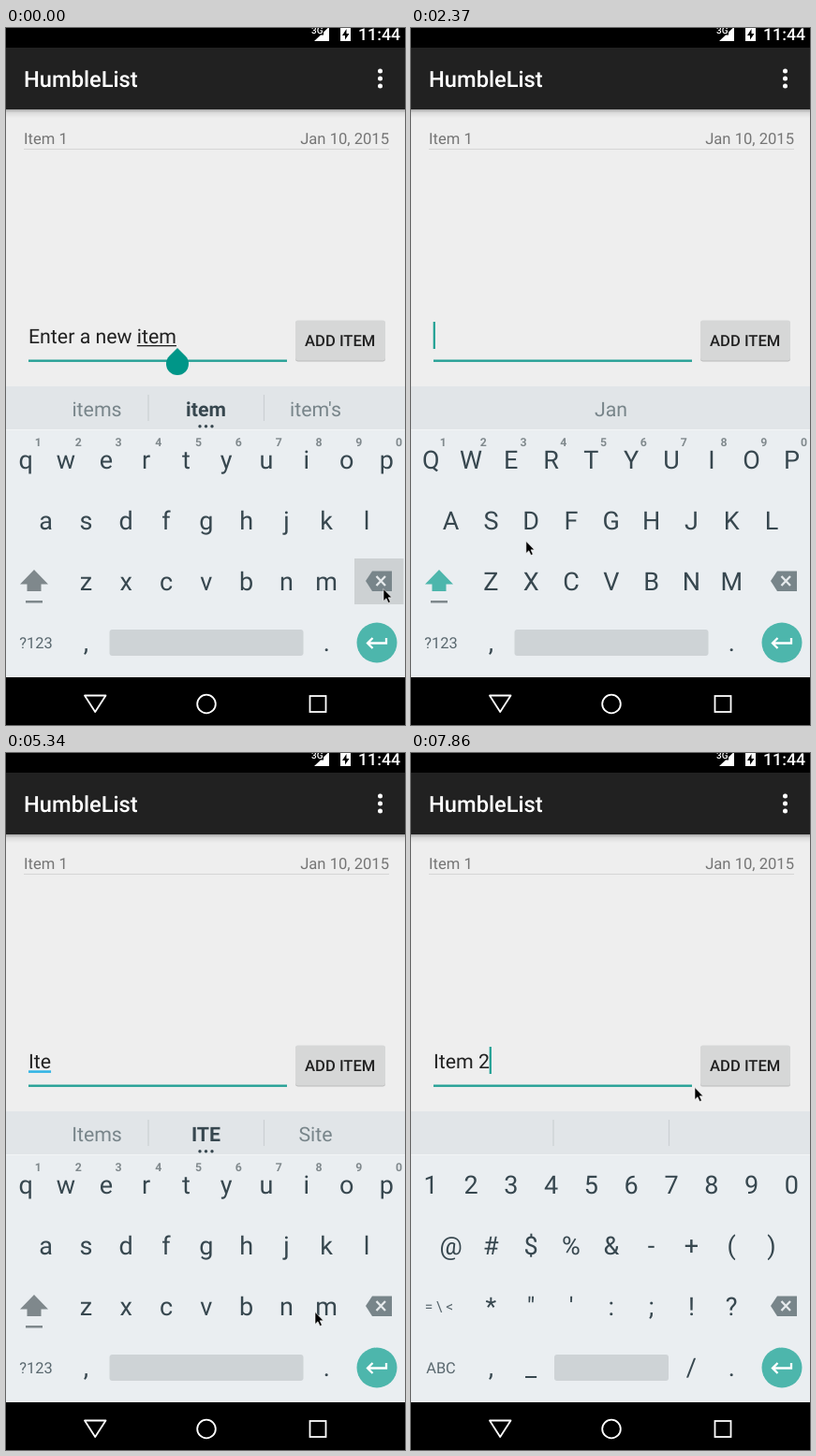
These frames come from a looping animation (426 by 745 pixels, 8000 ms). An HTML page:

```html
<!DOCTYPE html>
<html lang="en">
<head>
<meta charset="utf-8">
<title>Todo entry</title>
<style>
  html, body { margin: 0; width: 100%; height: 100%; overflow: hidden; background: #000; }
  svg { display: block; width: 426px; height: 745px; font-family: Roboto, Arial, sans-serif; }
  text { white-space: pre; text-rendering: geometricPrecision; }
  .mid { text-anchor: middle; }
  .medium { font-weight: 500; }
  .key { font-size: 27px; fill: #37474f; text-anchor: middle; }
  .small { font-size: 16.4px; fill: #5a686f; text-anchor: middle; }
  .hint { font-size: 12.3px; font-weight: 700; fill: #80898d; text-anchor: middle; }
  .word { font-size: 21.3px; fill: #78858a; text-anchor: middle; }
  .word.bold { font-weight: 700; fill: #37474f; }
  .row { font-size: 16.6px; fill: #757575; }
</style>
</head>
<body>
<svg viewBox="0 0 426 745">
  <defs>
    <linearGradient id="shade" x2="0" y2="1">
      <stop stop-color="#000" stop-opacity=".3"/>
      <stop offset=".4" stop-color="#000" stop-opacity=".08"/>
      <stop offset="1" stop-color="#000" stop-opacity="0"/>
    </linearGradient>
  </defs>
  <rect width="426" height="745"/>

  <!-- status bar -->
  <g fill="#fff">
    <text x="326" y="6" font-size="10" class="medium">3G</text>
    <path d="M345 0V14H329L336 7.5H339V4.500L343.500 0Z"/>
    <path d="M357 0H368V14H357Z"/>
    <path d="M363.500 1L359 8H362V12.500L366.500 6H363.500Z" fill="#000"/>
    <text x="376" y="12.500" font-size="17.800" class="medium">11:44</text>
  </g>

  <!-- app bar and list -->
  <rect y="87" width="426" height="296" fill="#eee"/>
  <rect y="87" width="426" height="9" fill="url(#shade)"/>
  <rect y="21" width="426" height="66" fill="#212121"/>
  <g fill="#fff">
    <text x="19" y="63" font-size="23.700" class="medium">HumbleList</text>
    <circle cx="399.500" cy="46" r="2.500"/>
    <circle cx="399.500" cy="54" r="2.500"/>
    <circle cx="399.500" cy="62" r="2.500"/>
  </g>
  <text class="row" x="19" y="124">Item 1</text>
  <text class="row" x="409" y="124" text-anchor="end">Jan 10, 2015</text>
  <rect x="19" y="129" width="390" height="1" fill="#d5d5d5"/>

  <!-- input -->
  <text id="entry" x="24" y="337" font-size="21.300" fill="#212121"></text>
  <rect id="underline" x="24"/>
  <rect x="24" y="354.500" width="276" height="2.400" fill="#26a196"/>
  <rect id="caret" y="314" width="2.200" height="29" fill="#1fa093"/>
  <path id="handle" d="M183 342L191.500 350.500A12 12 0 1 1 174.500 350.500Z" fill="#009688"/>
  <rect x="309" y="313.500" width="96" height="43" rx="2.400" fill="#bcbcbc"/>
  <rect x="309" y="312.500" width="96" height="43" rx="2.400" fill="#d6d7d7"/>
  <text class="mid medium" x="356.700" y="340" font-size="16.600" fill="#212121">ADD ITEM</text>

  <!-- keyboard -->
  <rect y="383" width="426" height="47" fill="#e1e5e8"/>
  <rect y="429" width="426" height="265" fill="#eaeef1"/>
  <rect y="429" width="426" height="1" fill="#f2f5f6"/>
  <path id="dividers" d="M152 392V420M275.500 392V420" stroke="#cbd0d3" stroke-width="1.200"/>
  <g id="words"></g>
  <g id="more" fill="#37474f">
    <circle cx="207" cy="425.800" r="1.700"/>
    <circle cx="213.500" cy="425.800" r="1.700"/>
    <circle cx="220" cy="425.800" r="1.700"/>
  </g>
  <rect id="pressed" x="372" y="567" width="52.500" height="49" fill="#cdd1d3"/>
  <g id="letters"></g>
  <g id="upper"></g>
  <g id="symbols"></g>
  <g id="shift" fill="#7f888c">
    <path id="shiftArrow" d="M30 579L45 594.500H37.500V602H22.500V594.500H15Z"/>
    <rect x="21" y="612" width="18" height="2.500"/>
  </g>
  <path d="M384 591L391 580.500H412V602H391Z" fill="#78858a"/>
  <path d="M395.500 586L405 596M405 586L395.500 596" stroke="#e6eaec" stroke-width="2.300"/>
  <rect id="space" y="643" height="28" rx="3" fill="#ced3d6"/>
  <circle cx="396" cy="657" r="21.500" fill="#4db6ac"/>
  <path d="M406 652V657.500H386M391.500 652L386 657.500L391.500 663" fill="none" stroke="#fff" stroke-width="2.300"/>

  <!-- navigation -->
  <g fill="none" stroke="#fff" stroke-width="1.800">
    <path d="M84 713.500H106.500L95.200 731Z" stroke-linejoin="round"/>
    <circle cx="214" cy="722.500" r="9.800"/>
    <rect x="324.500" y="714" width="17" height="17"/>
  </g>

  <path id="pointer" d="M0 0V13L3 10.200L5.200 15L7.400 14L5.200 9.300H9Z" stroke="#fff" stroke-width=".6"/>
</svg>
<script>
const LOOP = 8000, STEP = 148.4, PITCH = 42.8;
const $ = id => document.getElementById(id);
const show = (id, on) => $(id).setAttribute('visibility', on ? 'visible' : 'hidden');

function addText(parent, className, x, y, content) {
  const node = document.createElementNS('http://www.w3.org/2000/svg', 'text');
  node.setAttribute('class', className);
  node.setAttribute('x', x);
  node.setAttribute('y', y);
  node.textContent = content;
  parent.append(node);
  return node;
}

const addRow = (parent, chars, x, y, className = 'key') =>
  [...chars].forEach((char, i) => addText(parent, className, x + i * PITCH, y, char));

function buildLayer(id, rows, mode) {
  const layer = $(id);
  addRow(layer, rows[0], 21.2, 470.5);
  addRow(layer, rows[1], 42.6, 535.8);
  addRow(layer, rows[2], 85.4, 601);
  addText(layer, 'small', 32, 662.5, mode);
  addText(layer, 'key', 85.4, 665.8, ',');
  addText(layer, 'key', 342.2, 665.8, '.');
  return layer;
}

const alphabet = ['qwertyuiop', 'asdfghjkl', 'zxcvbnm'];
const letters = buildLayer('letters', alphabet, '?123');
const upper = buildLayer('upper', alphabet.map(row => row.toUpperCase()), '?123');
for (const layer of [letters, upper]) addRow(layer, '1234567890', 34.4, 447, 'hint');
const symbols = buildLayer('symbols', ['1234567890', '@#$%&-+()', '*"\':;!?'], 'ABC');
addText(symbols, 'small', 30, 597, '= \\ <').style.fontSize = '15.5px';
addText(symbols, 'key', 128.2, 665.8, '_');
addText(symbols, 'key', 299.4, 665.8, '/');
const words = [97, 213.5, 330.5].map(x => addText($('words'), 'word', x, 415, ''));

// Each entry changes only the listed properties from its time on.
const changes = [
  [0, { text: 'Enter a new item', line: [12, 16], lineKind: 'thin', handle: true, caret: false,
        pressed: true, words: ['items', 'item', "item's"], bold: true, layer: 'letters' }],
  [290, { text: 'Enter a new it', line: null, handle: false, caret: true }],
  [440, { text: 'Enter a new ', words: ['as', 'and', 'at'], bold: false }],
  [590, { text: 'Enter a ne' }],
  [740, { text: 'Enter a ' }],
  [890, { text: 'Enter ' }],
  [1040, { text: 'Ent' }],
  [1180, { text: '' }],
  [1330, { pressed: false, words: ['', 'Jan', ''] }],
  [1630, { caret: false }],
  [2070, { layer: 'upper', caret: true }],
  [2520, { caret: false }],
  [2820, { text: 'I', line: [0, 1], caret: true, layer: 'letters', words: ['Is', 'In', 'It'] }],
  [3410, { text: 'It', line: [0, 2] }],
  [3560, { words: ['Its', 'It', "It's"], bold: true }],
  [4000, { caret: false }],
  [4450, { text: 'Ite', line: [0, 3], caret: true }],
  [4600, { words: ['Items', 'ITE', 'Site'], lineKind: 'thick' }],
  [5040, { caret: false }],
  [5490, { text: 'Item', line: [0, 4], lineKind: 'thin', caret: true }],
  [5640, { words: ['Items', 'Item', "Item's"] }],
  [6080, { text: 'Item ', line: null, words: ['', '', ''], bold: false }],
  [6380, { caret: false }],
  [6680, { layer: 'symbols', caret: true }],
  [7120, { caret: false }],
  [7570, { text: 'Item 2', caret: true }]
];

// Pointer way points: time, x, y.
const route = [
  [0, 403, 599.5], [1340, 403, 599.5], [1784, 5, 585.5], [1935, 25, 591], [2230, 25, 591],
  [2675, 320, 463], [2823, 318, 462], [2971, 282.5, 456.5], [3270, 191, 467], [3860, 191, 467],
  [4310, 105, 467], [4610, 105, 467], [5050, 351, 580], [5197, 336, 594], [5345, 330, 597.5],
  [5495, 330, 597.5], [5795, 300, 646], [6090, 300, 646], [6385, 60, 667], [6533, 26, 661],
  [6690, 26, 661], [6980, 58, 480], [7130, 58, 475], [7275, 60, 474], [7575, 60, 474],
  [7868, 303, 357.5], [LOOP, 303, 357.5]
];

function pointerAt(time) {
  const i = Math.max(1, route.findIndex(point => point[0] > time));
  const [t0, x0, y0] = route[i - 1], [t1, x1, y1] = route[i];
  const k = (time - t0) / (t1 - t0);
  return [x0 + (x1 - x0) * k, y0 + (y1 - y0) * k];
}

function setAttributes(id, values) {
  for (const name in values) $(id).setAttribute(name, values[name]);
}

function render(time) {
  // The screen refreshes in even steps, so motion is held between them.
  const now = Math.max(0, 300 + STEP * Math.floor((time - 285) / STEP));
  const state = {};
  for (const [start, change] of changes) if (start <= now) Object.assign(state, change);

  const entry = $('entry');
  entry.textContent = state.text;
  const widthTo = count => count ? entry.getSubStringLength(0, count) : 0;
  setAttributes('caret', { x: 23.7 + widthTo(state.text.length) });
  show('caret', state.caret);
  show('handle', state.handle);
  show('pressed', state.pressed);

  show('underline', state.line);
  if (state.line) {
    const [from, to] = state.line.map(widthTo);
    const thick = state.lineKind === 'thick';
    setAttributes('underline', {
      x: 24 + from, width: to - from, y: thick ? 339.3 : 339,
      height: thick ? 2.6 : 1.3, fill: thick ? '#33b5e5' : '#212121'
    });
  }

  words.forEach((node, i) => {
    node.textContent = state.words[i];
    node.setAttribute('class', i === 1 && state.bold ? 'word bold' : 'word');
  });
  show('dividers', state.words[0] || !state.words[1]);
  show('more', state.words[0]);

  for (const id of ['letters', 'upper', 'symbols']) show(id, id === state.layer);
  const isSymbols = state.layer === 'symbols';
  show('shift', !isSymbols);
  setAttributes('shiftArrow', { fill: state.layer === 'upper' ? '#4db6ac' : '#7f888c' });
  setAttributes('space', isSymbols ? { x: 153, width: 122 } : { x: 110.5, width: 207 });
  setAttributes('pointer', { transform: `translate(${pointerAt(now)})` });
}

function tick() {
  render(performance.now() % LOOP);
  requestAnimationFrame(tick);
}
tick();
</script>
</body>
</html>
```
